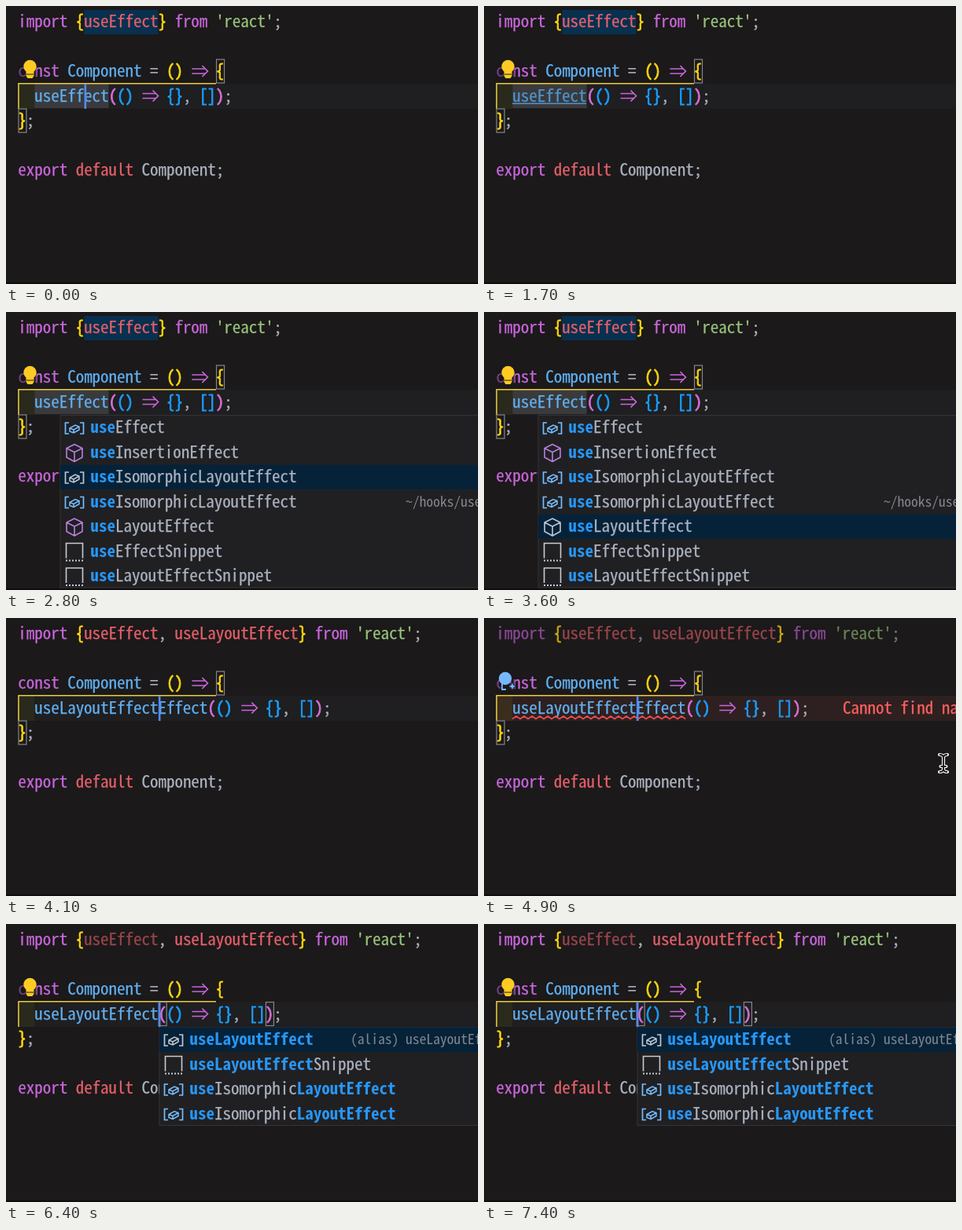
Recreate the animation shown at these times as an HTML page. Size 600 by 354 pixels, loop 7.5 s.

```html
<!DOCTYPE html>
<html lang="en">
<head>
<meta charset="utf-8">
<title>Editor autocomplete</title>
<style>
  html, body { margin: 0; width: 100%; height: 100%; overflow: hidden; background: #1b191a; }
  svg { display: block; width: 600px; height: 354px; }
  text { white-space: pre; font-family: "Noto Sans Mono CJK KR", "Noto Sans Mono CJK JP", "Noto Sans Mono", monospace; }
</style>
</head>
<body>
<svg id="stage" viewBox="0 0 600 354"></svg>
<script>
const LOOP = 7500, LEFT = 15.3, CHAR = 10.48, ROW = 31.5;
const C = {
  bg: '#1b191a', fg: '#abb2bf', purple: '#c966dc', blue: '#61afef', red: '#e45f69',
  green: '#98c379', gold: '#ffd70a', orchid: '#d670d6', azure: '#179fff',
  caret: '#528bff', match: '#2797f7', error: '#ff6060', icon: '#75beff', cube: '#b87fdc'
};
const stage = document.getElementById('stage');

// Choose the font size whose monospace advance equals one column.
const probe = document.createElement('canvas').getContext('2d');
probe.font = '100px "Noto Sans Mono CJK KR", "Noto Sans Mono CJK JP", "Noto Sans Mono", monospace';
const SIZE = CHAR * 100 / probe.measureText('0').width;

const colX = col => LEFT + col * CHAR;
const lineTop = line => 5 + line * ROW - (line ? 0.5 : 0);
const escapeText = s => s.replace(/&/g, '&amp;').replace(/</g, '&lt;').replace(/>/g, '&gt;');
const rect = (x, y, w, h, fill, extra = '') =>
  `<rect x="${x}" y="${y}" width="${w}" height="${h}" fill="${fill}" ${extra}/>`;
const path = (d, stroke, width = 1.6, extra = '') =>
  `<path d="${d}" fill="none" stroke="${stroke}" stroke-width="${width}" ${extra}/>`;
const text = (x, y, s, fill, extra = '', size = SIZE) =>
  `<text x="${x.toFixed(2)}" y="${y}" font-size="${size}" fill="${fill}" ${extra}>${escapeText(s)}</text>`;
const mark = (line, from, to, fill) =>
  rect(colX(from), lineTop(line), (to - from) * CHAR, 31, fill);
const bracketBox = (line, col) =>
  rect(colX(col) + 0.7, lineTop(line) + 0.5, 10, 30, 'none', 'stroke="#85858a" stroke-width="1.2"');

function arrow(x, y, color) {
  return path(`M${x + 1} ${y - 3}H${x + 18}M${x + 1} ${y + 3}H${x + 18}`, color, 1.7) +
    path(`M${x + 14} ${y - 7}L${x + 21} ${y}L${x + 14} ${y + 7}`, color, 1.7);
}

// Each token is [text, color, opacity]; "=>" becomes one wide arrow, brackets are heavier.
function codeLine(line, tokens, col = 0) {
  const y = 27 + line * ROW;
  return tokens.map(([s, color, opacity = 1]) => {
    const x = colX(col), weight = /^[(){}[\]]+$/.test(s) ? 0.8 : 0.25;
    col += s.length;
    return s === '=>' ? arrow(x, y - 7, color)
      : text(x, y, s, color, `opacity="${opacity}" stroke="${color}" stroke-width="${weight}"`);
  }).join('');
}

function importLine(s) {
  const all = s.error ? 0.62 : 1, brace = s.error ? 0.75 : 1;
  const names = s.imported
    ? [['useEffect', C.red, s.cleared ? 0.62 : all], [', ', C.fg, all], ['useLayoutEffect', C.red, all]]
    : [['useEffect', C.red]];
  return codeLine(0, [['import ', C.purple, all], ['{', C.gold, brace], ...names,
    ['}', C.gold, brace], [' from ', C.purple, all], ["'react'", C.green, all], [';', C.fg, all]]);
}

function bulb(kind) {
  const blue = kind === 'blue', x = blue ? 27 : 30.5, color = blue ? '#75b8ff' : '#ffcb22';
  let out = rect(15, 69, 24, 25, C.bg, 'opacity=".5"') +
    rect(x - 5.5, 69, 11, 24, C.bg) +
    `<circle cx="${x}" cy="77" r="8.2" fill="${color}"/>`;
  if (!blue) {
    return out + `<path d="M${x - 5} 82h10v7l-2 3h-6l-2-3z" fill="${color}"/>` +
      path(`M${x - 4.5} 87h9`, '#5d4715', 1.4);
  }
  out += path(`M${x - 4} 83v8h5`, color, 1.8);
  return out + `<path d="M36 81l1.6 4.4 4.4 1.6-4.4 1.6-1.6 4.4-1.6-4.4-4.4-1.6 4.4-1.6z" fill="${color}" stroke="${C.bg}"/>`;
}

function icon(kind, x, y, active) {
  if (kind === 'variable') {
    const color = active ? '#c0c6d0' : C.icon;
    return path(`M${x - 7} ${y - 7}h-4.5v14h4.5M${x + 7} ${y - 7}h4.5v14h-4.5`, color, 1.7) +
      path(`M${x - 6} ${y}l7-4 5 2v4l-7 4-5-2zM${x - 6} ${y}l5 2 7-4M${x - 1} ${y + 2}v4`, color, 1.5);
  }
  if (kind === 'cube') {
    return path(`M${x} ${y - 11}l10 5v11.5l-10 5.5-10-5.5V${y - 6}zM${x - 10} ${y - 6}l10 5 10-5M${x} ${y - 1}v12`,
      active ? '#c0c6d0' : C.cube, 1.6, 'stroke-linejoin="round"');
  }
  return path(`M${x - 10.5} ${y + 8}V${y - 11}h21v19`, '#c8ccd2') +
    path(`M${x - 11} ${y + 11}h23`, '#c8ccd2', 2, 'stroke-dasharray="2 2"');
}

const ISO = ['variable', '*use*IsomorphicLayoutEffect'];
const WIDE_LIST = [
  ['variable', '*use*Effect'], ['cube', '*use*InsertionEffect'], ISO,
  [...ISO, '~/hooks/useIsomorphic', 508], ['cube', '*use*LayoutEffect'],
  ['snippet', '*use*EffectSnippet'], ['snippet', '*use*LayoutEffectSnippet']
];
const ISO_MATCH = ['variable', '*use*Isomorphic*LayoutEffect*'];
const SHORT_LIST = [
  ['variable', '*useLayoutEffect*', '(alias) useLayoutEffect', 438],
  ['snippet', '*useLayoutEffect*Snippet'], ISO_MATCH, ISO_MATCH
];

// Asterisks enclose the matched part of a label.
function popup(left, items, selected) {
  const top = 131.5;
  let out = rect(left, top, 620, items.length * ROW - 1, '#202023', 'stroke="#343438"');
  items.forEach(([kind, label, detail, detailX], i) => {
    const y = top + i * ROW, active = i === selected;
    if (active) out += rect(left, y, 620, ROW, '#062239');
    out += icon(kind, left + 18, y + 16.5, active);
    let x = left + 38.5;
    label.split('*').forEach((part, n) => {
      const style = n % 2 ? 'font-weight="700"' : `stroke="${C.fg}" stroke-width=".25"`;
      if (part) out += text(x, y + 22.5, part, n % 2 ? C.match : C.fg, style);
      x += part.length * CHAR;
    });
    if (detail) out += text(detailX, y + 21.5, detail, '#84878d', '', SIZE * 0.835);
  });
  return out;
}

function squiggle(from, to) {
  let d = `M${from} 128.5`;
  for (let x = from + 5, up = true; x <= to; x += 5, up = !up) d += `L${x} ${up ? 125 : 128.5}`;
  return path(d, '#ee4d50', 1.6, 'stroke-linejoin="round"');
}

function pointer(t) {
  const y = t < 5000 ? 185 : 185 + (t - 5000) / 40;
  const d = `M579 ${y - 11}q5 0 5 4v14q0 4-5 4M589 ${y - 11}q-5 0-5 4v14q0 4 5 4M580.5 ${y + 4}h7`;
  return path(d, '#f2f2f2', 4.2, 'stroke-linecap="round"') + path(d, '#161616', 1.8);
}

// The last step reached at time t, given [time, value] pairs.
const stepAt = (t, steps) => steps.reduce((value, [at, next]) => t >= at ? next : value, steps[0][1]);

const CARET = [[0, 8], [800, 7], [900, 6], [1000, 5], [3900, 17], [5500, 23], [6100, 17]];
const PICK = [[2000, 0], [2400, 1], [2700, 2], [3000, 3], [3300, 4]];

function stateAt(t) {
  const movedAt = stepAt(t, CARET.map(([at]) => [at, at]));
  return {
    imported: t >= 3900,
    error: t >= 4300 && t < 6300,
    cleared: t >= 6300,
    selecting: t >= 5500 && t < 6100,
    deleted: t >= 6100,
    hover: t >= 1600 && t < 2000,
    caret: stepAt(t, CARET),
    caretOn: (t - movedAt) % 1000 < 500
  };
}

function scene(t) {
  const s = stateAt(t);
  const hook = !s.imported ? 'useEffect' : s.deleted ? 'useLayoutEffect' : 'useLayoutEffectEffect';
  const end = 2 + hook.length;
  let out = rect(0, 0, 600, 354, C.bg);

  out += rect(15, 99, 585, 32, s.error ? '#2e2020' : '#1f1e20');
  out += rect(15, 99, 21, 32, s.error ? '#3a2d1d' : '#292a1c');
  if (!s.imported) out += mark(0, 8, 17, '#08304f') + mark(3, 2, 11, '#3a3a3c');
  if (s.selecting) {
    out += mark(0, 11, 17, '#1d2a3a') + mark(0, 28, 34, '#1d2a3a') + mark(3, 17, 23, '#2f4360');
  }

  out += importLine(s);
  out += codeLine(2, [['const ', C.purple], ['Component', C.blue], [' = ', C.fg],
    ['()', C.gold], [' ', C.fg], ['=>', C.purple], [' ', C.fg], ['{', C.gold]]);
  out += codeLine(3, [[hook, s.hover ? '#4e94ce' : C.blue], ['(', C.orchid], ['()', C.azure],
    [' ', C.fg], ['=>', C.purple], [' ', C.fg], ['{}', C.azure], [', ', C.fg],
    ['[]', C.azure], [')', C.orchid], [';', C.fg]], 2);
  out += codeLine(4, [['}', C.gold], [';', C.fg]]);
  out += codeLine(6, [['export ', C.purple], ['default ', C.red], ['Component;', C.fg]]);

  out += path('M267 98.7H16V131', '#eecb40', 1.5);
  if (s.deleted) out += bracketBox(3, end) + bracketBox(3, end + 13);
  else if (!s.selecting) out += bracketBox(2, 24) + bracketBox(4, 0);

  if (s.hover) out += rect(36, 123.5, 94, 1.5, '#4e94ce');
  if (s.error) {
    out += squiggle(36, colX(end));
    out += text(456, 121.5, "Cannot find name 'useLayoutEffectEffect'.", C.error,
      `stroke="${C.error}" stroke-width=".25"`);
  }
  if (s.error) out += bulb('blue');
  else if (!s.imported || s.cleared) out += bulb('yellow');
  if (s.caretOn) out += rect(colX(s.caret) + 0.4, 99, 2.6, 32, C.caret);

  if (t >= 2000 && t < 3900) out += popup(69, WIDE_LIST, stepAt(t, PICK));
  if (t >= 6200) out += popup(195, SHORT_LIST, 0);
  if (t >= 4600 && t < 5400) out += pointer(t);
  return out + rect(0, 352, 600, 2, '#0f0d0e');
}

let shown = '';
const start = performance.now();
function frame() {
  const markup = scene((performance.now() - start) % LOOP);
  if (markup !== shown) stage.innerHTML = shown = markup;
  requestAnimationFrame(frame);
}
frame();
</script>
</body>
</html>
```
